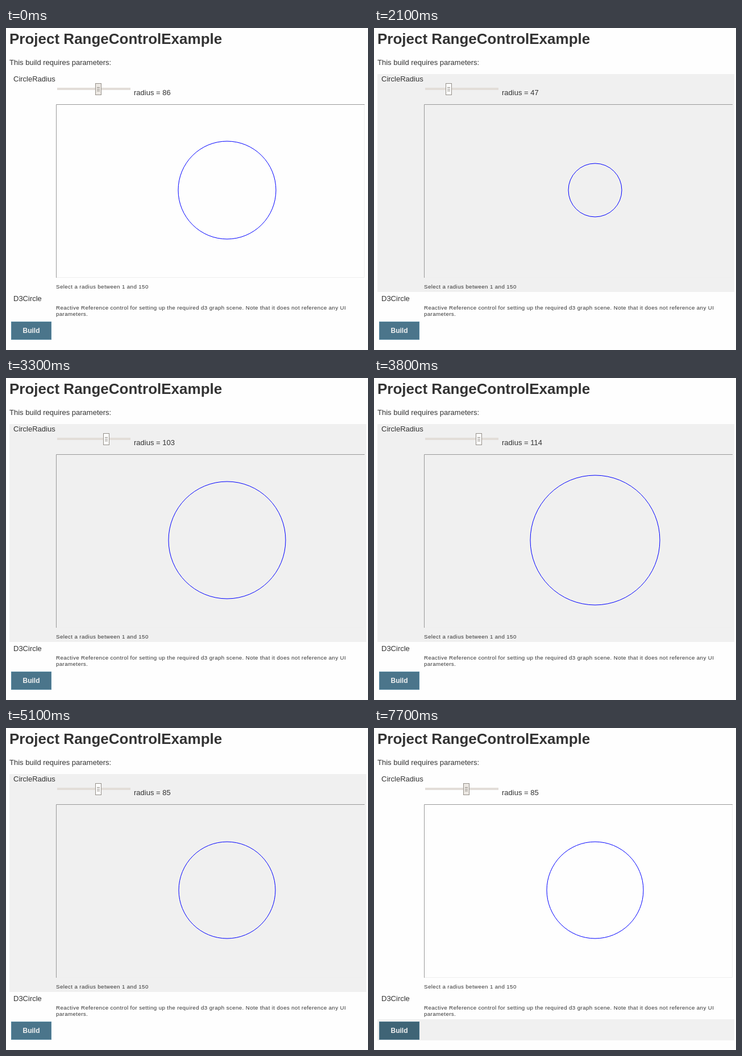
Write an HTML page that moves like this. It is 637 px wide and 566 px high and loops after 8000 ms.

```html
<!DOCTYPE html>
<html lang="en">
<head>
<meta charset="utf-8">
<title>Range control</title>
<style>
  html, body { margin: 0; width: 100%; height: 100%; overflow: hidden; background: #fefefe; }
  svg { display: block; }
  text { font: 13px "Liberation Sans", Arial, sans-serif; fill: #333; }
  .title { font-size: 26px; font-weight: bold; }
  .note { font-size: 9.75px; letter-spacing: .38px; }
  .label { font-size: 12px; font-weight: bold; fill: #f3f3f3; text-anchor: middle; }
</style>
</head>
<body>
<svg width="637" height="566" viewBox="0 0 637 566">
  <rect id="row" x="6" width="628" fill="#f0f0f0"/>

  <text class="title" x="6" y="28">Project RangeControlExample</text>
  <text x="6" y="65">This build requires parameters:</text>
  <text x="13" y="94">CircleRadius</text>
  <text id="value" x="225" y="118"></text>

  <rect x="90" y="105" width="129" height="4" fill="#e2ddd8"/>
  <g id="thumb">
    <rect id="knob" x=".5" y=".5" width="10" height="20" stroke="#95908a"/>
    <path d="M3 7.5h5M3 10.5h5M3 13.5h5" stroke="#8a857f"/>
  </g>

  <path d="M630.5 135V438.5H89" fill="none" stroke="#eee"/>
  <path d="M88.5 439V134.5H631" fill="none" stroke="#999"/>
  <circle id="circle" cx="389" cy="285" fill="none" stroke="#00f"/>

  <text class="note" x="88" y="458">Select a radius between 1 and 150</text>
  <text x="13" y="480">D3Circle</text>
  <text class="note" x="88" y="495">Reactive Reference control for setting up the required d3 graph scene. Note that it does not reference any UI</text>
  <text class="note" x="88" y="506">parameters.</text>

  <rect id="button" x="9.5" y="516.5" width="70" height="31"/>
  <text class="label" x="44.5" y="536">Build</text>
</svg>
<script>
const LOOP = 8000, STEP = 100;

// [time, radius]: the slider is dragged between these points
const drag = [
  [0, 86], [1500, 86], [1600, 85], [1700, 85], [2100, 47], [2300, 41],
  [2600, 55], [3300, 103], [3500, 108], [3800, 114], [4300, 93],
  [4400, 93], [4500, 91], [4600, 91], [5100, 85], [LOOP, 85]
];

// [start, top, height] of the row under the pointer
const hovers = [[0, 0, 0], [900, 81, 383], [7000, 464, 48], [7600, 512, 37]];

const el = id => document.getElementById(id);
const set = (id, attrs) => {
  for (const name in attrs) el(id).setAttribute(name, attrs[name]);
};

function radiusAt(t) {
  const i = drag.findIndex(key => key[0] > t);
  const [t0, r0] = drag[i - 1], [t1, r1] = drag[i];
  return Math.round(r0 + (r1 - r0) * (t - t0) / (t1 - t0));
}

function draw(time) {
  const t = Math.floor(time % LOOP / STEP) * STEP;
  const r = radiusAt(t);
  const [, y, height] = hovers.filter(h => h[0] <= t).pop();
  const held = t >= 1100 && t < 7000;
  const pressed = t >= 7700;

  set('row', { y, height });
  set('circle', { r });
  set('thumb', { transform: `translate(${Math.round(90 + (r - 1) * 118 / 149)} 97)` });
  set('knob', { fill: held ? '#fdfdfc' : '#ece8e3' });
  set('button', {
    fill: pressed ? '#3f6476' : '#4b758b',
    stroke: pressed ? '#4b758b' : '#5788a1'
  });
  el('value').textContent = `radius = ${r}`;
}

const start = performance.now();
function tick() {
  draw(performance.now() - start);
  requestAnimationFrame(tick);
}
tick();
</script>
</body>
</html>
```
